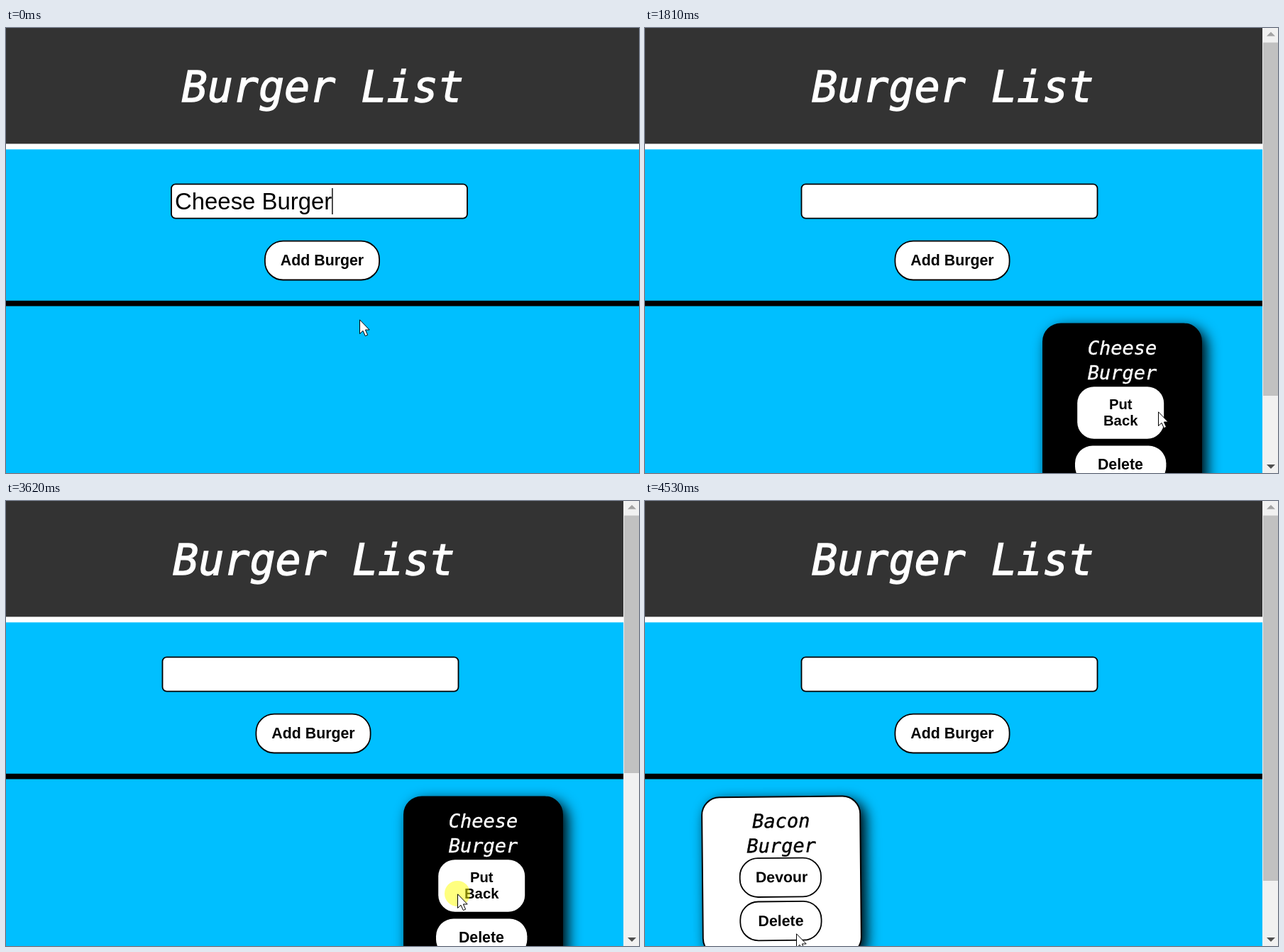
Animation, 892 px wide and 628 px high, one loop 6350 ms. Source, as an HTML page:

```html
<!DOCTYPE html>
<html lang="en">
<head>
<meta charset="utf-8">
<title>Burger List</title>
<style>
  html, body { margin: 0; width: 100%; height: 100%; overflow: hidden; background: #00bfff; }
  svg { display: block; width: 892px; height: 628px; }
  text { font-family: "Liberation Sans", Arial, sans-serif; text-anchor: middle; }
  .mono { font-family: "DejaVu Sans Mono", monospace; font-style: italic; stroke: currentColor; fill: currentColor; }
  .title { font-size: 60px; color: #fff; stroke-width: 1.4px; }
  .name { font-size: 27px; stroke-width: .4px; }
  .label { font-size: 21.33px; font-weight: bold; }
  .typed { font-size: 32.9px; text-anchor: start; }
  .outlined { fill: #fff; stroke: #000; stroke-width: 1.8; }
  .shadow { filter: blur(9.5px); }
</style>
</head>
<body>
<svg id="stage" viewBox="0 0 892 628"></svg>
<script>
const LOOP = 6350;

// A card is [name, tilt in degrees, button hovered].
const steps = [
  { at: 0,    cursor: [498, 411], typed: "Cheese Burger" },
  { at: 310,  cursor: [308, 475], thumb: 536, fresh: ["Cheese", -.3] },
  { at: 1810, cursor: [723, 541], thumb: 519, eaten: ["Cheese", 0, true] },
  { at: 2120, cursor: [303, 573], thumb: 519, fresh: ["Bacon", -.55], eaten: ["Cheese", -.5] },
  { at: 3620, cursor: [636, 554], thumb: 384, eaten: ["Cheese", 0, true], click: true },
  { at: 3920, cursor: [565, 571], thumb: 519, fresh: ["Cheese", -.3], eaten: ["Bacon", -.3] },
  { at: 4230, cursor: [259, 576], thumb: 519, fresh: ["Cheese", -.3], eaten: ["Bacon", -.3] },
  { at: 4530, cursor: [213, 610], thumb: 536, fresh: ["Bacon", -.55] }
];

const rect = (x, y, w, h, attrs) =>
  `<rect x="${x}" y="${y}" width="${w}" height="${h}" ${attrs}/>`;
const text = (cls, x, y, str) => `<text class="${cls}" x="${x}" y="${y}">${str}</text>`;
const label = (x, y, str) => text("label", x, y, str);
const pill = (x, y, w, h) => rect(x, y, w, h, 'rx="25.6" class="outlined"');

function page(typed) {
  const caret = typed ? rect(459.2, 226, 1.4, 37, "") : "";
  return `<g transform="translate(${typed ? 0 : -12.5} 0)">
    ${text("mono title", 446.3, 103.5, "Burger List")}
    ${rect(233, 220.3, 417, 48.3, 'rx="6" class="outlined"')}
    ${text("typed", 238, 256, typed || "")}${caret}
    ${pill(364.9, 300.7, 161.2, 54.8)}
    ${label(445.5, 335, "Add Burger")}
  </g>`;
}

function card(x, height, tilt, ink, fill, name, buttons) {
  const top = 416.4;
  const mid = x + 112.5;
  return `<g transform="rotate(${tilt} ${mid} ${top + height / 2})">
    ${rect(x + 6.7, top + 6.7, 225, height, 'rx="26" class="shadow"')}
    ${rect(x + 1, top + 1, 223, height - 2, `rx="25" fill="${fill}" stroke="#000" stroke-width="1.9"`)}
    <g color="${ink}">${text("mono name", mid, 460.9, name)}${text("mono name", mid, 495.9, "Burger")}</g>
    ${buttons}
  </g>`;
}

function freshCard(name, tilt) {
  return card(80, 226, tilt, "#000", "#fff", name,
    pill(133.7, 503.9, 114.3, 54.8) + label(192.6, 538, "Devour") +
    pill(133.7, 565.2, 114.3, 54.8) + label(190.9, 599.7, "Delete"));
}

function eatenCard(name, tilt, hovered) {
  const plain = 'rx="24.7" fill="#fff"';
  const scale = hovered ? .95 : 1;
  return card(560, 275, tilt, "#fff", "#000", name,
    `<g transform="translate(670.2 542.9) scale(${scale})">
      ${rect(-64.2, -38.7, 128.4, 77.4, plain)}
      ${label(0, -4.7, "Put")}${label(0, 19.3, "Back")}
    </g>
    ${rect(606, 589.5, 128.4, 54, plain)}${label(669.9, 623.3, "Delete")}`);
}

function scrollbar(bottom) {
  return rect(870, 0, 22, 628, 'fill="#f1f1f1"') +
    rect(871, 20.5, 21, bottom - 20.5, 'fill="#c1c1c1"') +
    `<path d="M876 11.5h12l-6-6z" fill="#a3a3a3"/><path d="M876 616h12l-6 6z" fill="#505050"/>`;
}

function pointer([x, y], click) {
  const halo = click ? '<circle r="18" fill="#ff0" fill-opacity=".5"/>' : "";
  return `<g transform="translate(${x} ${y})">${halo}
    <path d="M.5 .8V20.5L5 16.3 8.3 23.6 11.6 22.2 8.4 15H14.2Z" fill="#fff" stroke="#000"/>
  </g>`;
}

const scene = s => `<g display="none">
  ${page(s.typed)}
  ${s.fresh ? freshCard(...s.fresh) : ""}
  ${s.eaten ? eatenCard(...s.eaten) : ""}
  ${s.thumb ? scrollbar(s.thumb) : ""}
  ${pointer(s.cursor, s.click)}
</g>`;

const stage = document.getElementById("stage");
stage.innerHTML =
  rect(0, 0, 892, 628, 'fill="#00bfff"') +
  rect(0, 0, 892, 171.3, 'fill="#fff"') +
  rect(0, 0, 892, 163.4, 'fill="#333"') +
  rect(0, 384.8, 892, 7.7, "") +
  `<g id="scenes">${steps.map(scene).join("")}</g>`;

const scenes = [...document.getElementById("scenes").children];
const start = performance.now();
let shown = -1;

function draw() {
  const t = (performance.now() - start) % LOOP;
  const now = steps.findLastIndex(s => s.at <= t);
  if (now !== shown) {
    scenes.forEach((g, i) => g.setAttribute("display", i === now ? "inline" : "none"));
    shown = now;
  }
  requestAnimationFrame(draw);
}
draw();
</script>
</body>
</html>
```
